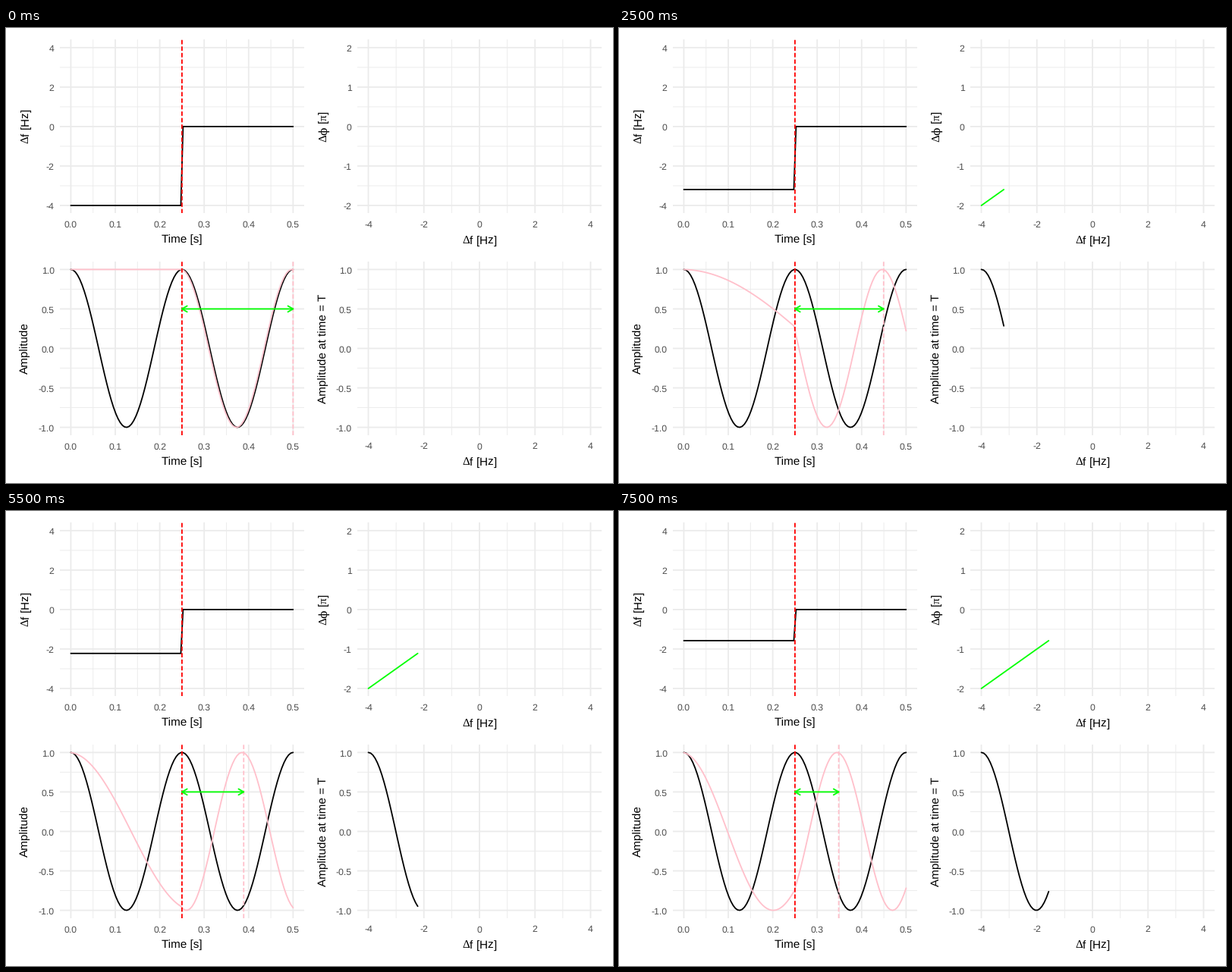
Write a matplotlib script that moves like this. It is 800 px wide and 600 px high and loops after 8000 ms.

```python
import numpy as np
import matplotlib.pyplot as plt
from matplotlib.animation import FuncAnimation

LW = 1.3

plt.rcParams.update({
    "font.family": "Liberation Sans",
    "mathtext.fontset": "custom",
    "mathtext.rm": "Liberation Serif",
    "mathtext.it": "DejaVu Serif",
    "text.hinting": "none",
    "path.snap": False,
    "lines.linewidth": LW,
    "lines.solid_capstyle": "round",
    "lines.solid_joinstyle": "round",
})

STAGE_W, STAGE_H, DPI = 800, 600, 100
PANEL_W, PANEL_H = 322.2, 229.0
LEFT, RIGHT = 70.8, 462.9
TOP, BOTTOM = 15.45, 308.0
FRAMES, STEP = 16, 8 / 99
DASH = (0, (3.15, 1.6))

F0 = 4.0
T = 0.25
t = np.linspace(0, 0.5, 100)
dt = t[1]

fig = plt.figure(figsize=(STAGE_W / DPI, STAGE_H / DPI), dpi=DPI, facecolor="white")


def label(x, y, s, size=11, color="black", ha="center", rotation=0):
    fig.text(x / STAGE_W, 1 - y / STAGE_H, s, size=size, color=color, ha=ha,
             va="baseline", rotation=rotation, rotation_mode="anchor")


def panel(x0, y0, xticks, yticks, xfmt, yfmt, xtitle, ytitle, xbase, ybase):
    """Minimal-theme panel: pale grid, grey tick labels, no frame."""
    ax = fig.add_axes([x0 / STAGE_W, 1 - (y0 + PANEL_H) / STAGE_H,
                       PANEL_W / STAGE_W, PANEL_H / STAGE_H])
    ax.axis("off")
    lims = []
    for ticks in (xticks, yticks):
        pad = 0.05 * (ticks[-1] - ticks[0])
        lims.append((ticks[0] - pad, ticks[-1] + pad))
    ax.set(xlim=lims[0], ylim=lims[1])

    for ticks, line in ((xticks, ax.axvline), (yticks, ax.axhline)):
        for v in (ticks[1:] + ticks[:-1]) / 2:
            line(v, color="#EBEBEB", lw=LW / 2, zorder=0)
        for v in ticks:
            line(v, color="#EBEBEB", lw=LW, zorder=0.5)

    (xa, xb), (ya, yb) = lims
    for v in xticks:
        label(x0 + (v - xa) / (xb - xa) * PANEL_W, y0 + PANEL_H + 18.4,
              xfmt % v, 8.8, "#4D4D4D")
    for v in yticks:
        label(x0 - 7.2, y0 + (yb - v) / (yb - ya) * PANEL_H + 5,
              yfmt % v, 8.8, "#4D4D4D", "right")
    label(x0 + PANEL_W / 2, y0 + PANEL_H + xbase, xtitle)
    label(ybase, y0 + PANEL_H / 2, ytitle, rotation=90)
    return ax


def line(ax, color, x=(), y=(), ls="solid", zorder=2):
    return ax.plot(x, y, color=color, ls=ls, zorder=zorder,
                   scalex=False, scaley=False)[0]


def vline(ax, x, color, zorder):
    return line(ax, color, (x, x), ax.get_ylim(), DASH, zorder)


times = np.linspace(0, 0.5, 6)
hertz = np.linspace(-4, 4, 5)
phases = np.linspace(-2, 2, 5)
amps = np.linspace(-1, 1, 5)
DF = r"$\mathrm{Δ}$f [Hz]"
DPHI = r"$\mathrm{Δ}\mathit{ϕ}$ [$\mathrm{π}$]"

ax_freq = panel(LEFT, TOP, times, hertz, "%.1f", "%d", "Time [s]", DF, 38.6, 31.3)
ax_phase = panel(RIGHT, TOP, hertz, phases, "%d", "%d", DF, DPHI, 40.2, 423.8)
ax_wave = panel(LEFT, BOTTOM, times, amps, "%.1f", "%.1f", "Time [s]", "Amplitude", 38.6, 28.7)
ax_amp = panel(RIGHT, BOTTOM, hertz, amps, "%d", "%.1f", DF, "Amplitude at time = T", 40.2, 421.7)

freq_line = line(ax_freq, "black")
phase_line = line(ax_phase, "#00FF00")
line(ax_wave, "black", t, np.cos(2 * np.pi * F0 * t))
wave_line = line(ax_wave, "pink")
amp_line = line(ax_amp, "black")

vline(ax_freq, T, "red", 4)
vline(ax_wave, T, "red", 4)
peak_line = vline(ax_wave, T, "pink", 5)
shaft, tail, tip = (line(ax_wave, "#00FF00", zorder=6) for _ in range(3))

HEAD = 7.87
head_x = HEAD * np.cos(np.pi / 6) * 0.55 / PANEL_W
head_y = HEAD * np.sin(np.pi / 6) * 2.2 / PANEL_H


def set_head(head, x, side):
    back = x - side * head_x
    head.set_data([back, x, back], [0.5 + head_y, 0.5, 0.5 - head_y])


def draw(k):
    df = -4 + 2 * STEP * k
    shift = np.where(t < T, df, 0)
    freq_line.set_data(t, shift)
    wave_line.set_data(t, np.cos(2 * np.pi * np.cumsum((F0 + shift) * dt)))

    peak = T - df / 16
    peak_line.set_xdata([peak, peak])
    shaft.set_data([T, peak], [0.5, 0.5])
    set_head(tail, T, -1)
    set_head(tip, peak, 1)

    seen = -4 + STEP * np.arange(2 * k + 1) if k else np.array([])
    phase_line.set_data(seen, seen / 2)
    amp_line.set_data(seen, np.cos(2 * np.pi * 50 * dt * (F0 + seen)))
    return freq_line, wave_line, peak_line, shaft, tail, tip, phase_line, amp_line


anim = FuncAnimation(fig, draw, frames=FRAMES, interval=500, repeat=True,
                     repeat_delay=0, blit=False)
plt.show()
```
